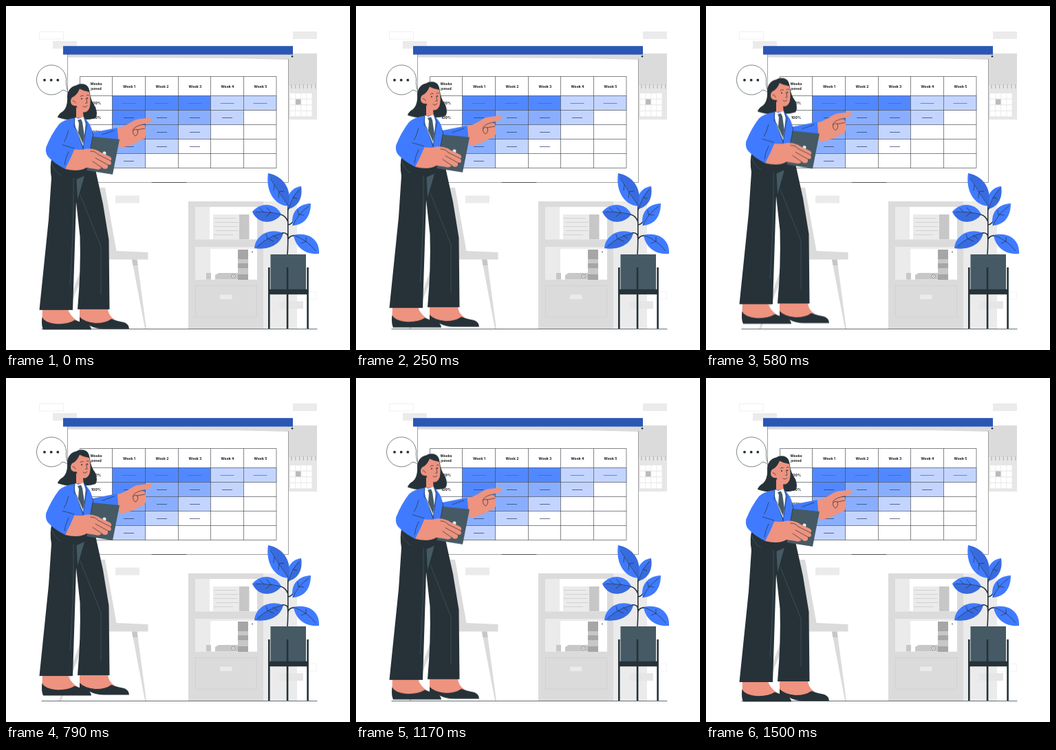
Write an HTML page that moves like this. It is 500 px wide and 500 px high and loops after 1540 ms.

```html
<!DOCTYPE html>
<html lang="en">
<head>
<meta charset="utf-8">
<title>Weekly chart presentation</title>
<style>
html, body { margin: 0; width: 100%; height: 100%; overflow: hidden; background: #fff; }
svg { display: block; width: 100vw; height: 100vh; }
text { font: 700 5.2px Inter, "Open Sans", sans-serif; fill: #1b1b1b; }
.line { fill: none; stroke: #263238; stroke-width: .7; stroke-linecap: round; stroke-linejoin: round; }
.seam { fill: none; stroke: #455a64; stroke-width: .7; }
.dark { fill: #263238; }
.slate { fill: #455a64; }
.blue { fill: #407bff; }
.skin { fill: #ed9380; }
.g1 { fill: #ebebeb; }
.g2 { fill: #dbdbdb; }
.g3 { fill: #c7c7c7; }
.white { fill: #fff; }
#woman { animation: bob 770ms cubic-bezier(.364, 0, .636, 1) -60ms infinite alternate; }
@keyframes bob {
  from { transform: translateY(0); }
  to { transform: translateY(-9.2px); }
}
</style>
</head>
<body>
<svg viewBox="0 0 500 500">
  <g id="wall">
    <rect x="48.5" y="37.5" width="35" height="10.5" fill="none" stroke="#f0f0f0"/>
    <rect class="g1" x="68" y="51" width="35" height="11"/>
    <rect class="g1" x="417" y="37" width="35" height="11"/>
    <rect class="g1" x="159" y="275.5" width="35" height="11"/>
    <rect x="417.5" y="415.5" width="34" height="10.5" fill="none" stroke="#f4f4f4"/>
    <rect class="g2" x="408" y="69" width="44" height="47"/>
    <g id="calendar"><rect x="408" y="115" width="44" height="50" fill="#e6e6e6"/></g>
  </g>

  <g id="chair">
    <path class="g2" d="M118 264H144L160.500 356 206.500 358V368.500H120Z"/>
    <path class="g2" d="M183 368.500H190.500L204 469H202ZM114 368H121L80 469H77Z"/>
    <path class="g3" d="M183 368.500H190.500L191.600 377H184.400Z"/>
  </g>

  <g id="cabinet">
    <rect class="g1" x="374" y="284" width="49" height="185"/>
    <rect x="397" y="429" width="35" height="11" fill="#e6e6e6"/>
    <rect class="g2" x="265" y="284" width="109" height="185"/>
    <rect class="g1" x="275" y="292" width="90" height="47.500"/>
    <rect class="white" x="296" y="292" width="69" height="47"/>
    <rect class="g1" x="301" y="303" width="38" height="36"/>
    <rect class="g3" x="339" y="303" width="14.500" height="36"/>
    <path d="M302 308.500H334M304 314.500H338M302 320.500H336M305 326.500H338M302 332.500H330" stroke="#c7c7c7" stroke-width=".7"/>
    <rect class="g1" x="275" y="350" width="90" height="48"/>
    <rect class="white" x="297" y="353" width="68" height="44.500"/>
    <rect class="g3" x="337" y="354" width="15" height="44"/>
    <path fill="#a6a6a6" d="M337 354H352V368H337ZM337 374H352V381H337ZM337 390H352V398H337Z"/>
    <path class="g3" d="M291 388H298V397.500H291ZM309 388H337V397.500H304V391Z"/>
    <circle cx="330.500" cy="392.800" r="2.600" fill="#fff" stroke="#777" stroke-width=".8"/>
    <circle cx="330.500" cy="392.800" r=".8" fill="#555"/>
    <circle cx="358" cy="357.500" r="1" fill="#777"/>
    <rect x="275.500" y="406.500" width="89" height="45.500" fill="none" stroke="#cfcfcf" stroke-width=".8"/>
    <rect class="g1" x="311" y="419.500" width="17.500" height="6.500"/>
  </g>

  <g id="board">
    <path class="white" d="M89.500 70H410.500V256.500H89.500Z" stroke="#777" stroke-width=".7"/>
    <path class="g2" d="M90 71H414L410 78 330 76 90 74.500Z"/>
    <path class="line" d="M212 256.500H262"/>
    <rect x="83" y="58.200" width="334" height="12.400" fill="#2a56b5"/>
    <circle class="dark" cx="416" cy="73.300" r="1.300"/>
    <g id="table"></g>
  </g>

  <path class="line" d="M52 469.500H452"/>

  <g id="plant">
    <path class="line" style="stroke-width:1.600" d="M409 362C411 335 409 310 410 291M410 314Q407 305 399 303M410 318Q416 317 418 311M409.500 337Q411 330 402 329.500M409.500 340Q412 333 420 334M410 297Q410 290 412 285"/>
    <g class="blue">
      <path d="M381 243C401 247 416 263 411 291C390 290 377 269 381 243Z"/>
      <path d="M429 262C412 264 405 281 411 295C428 290 431 275 429 262Z"/>
      <path d="M443 287C423 288 413 302 417 319C436 318 443 303 443 287Z"/>
      <path d="M358 299C370 284 393 286 400 303C389 318 366 318 358 299Z"/>
      <path d="M361 352C362 335 381 321 403 330C399 348 380 355 361 352Z"/>
      <path d="M455 360C456 340 440 328 418 333C421 352 437 362 455 360Z"/>
    </g>
    <g opacity=".12">
      <path d="M381 243C401 247 416 263 411 291Q397 270 381 243Z"/>
      <path d="M429 262C431 275 428 290 411 295Q415 278 429 262Z"/>
      <path d="M358 299C366 318 389 318 400 303Q380 299 358 299Z"/>
      <path d="M361 352C380 355 399 348 403 330Q382 334 361 352Z"/>
    </g>
    <path class="line" d="M384 250Q397 272 411 291M390 260L389 268M397 270L396 279M397 270L404 269M426 267Q415 278 411 295M417 278L423 280M440 291Q424 302 417 319M425 303L433 304M425 303L424 297M363 299Q383 299 400 303M374 299L369 294M385 300L379 293M385 300L378 306M366 349Q382 334 403 330M380 338L378 332M380 338L389 342M388 333L395 338M450 356Q438 340 418 333M436 342L436 336M436 342L429 345"/>
    <rect class="slate" x="384.500" y="361" width="51.500" height="52"/>
    <path class="dark" d="M381 380H383.600V411.700H407.800V380H410.400V411.700H437.300V380H439.900V469H437.300V419.300H410.400V469H407.800V419.300H383.600V469H381Z"/>
  </g>

  <g id="bubble">
    <path class="white" d="M87.300 111.300A21.600 21.600 0 1 0 82 122Q86 122 90.500 126Q87.500 119 87.300 111.300Z" stroke="#263238" stroke-width=".6"/>
    <circle class="dark" cx="56" cy="107.700" r="1.900"/>
    <circle class="dark" cx="65.700" cy="107.700" r="1.900"/>
    <circle class="dark" cx="75.300" cy="107.700" r="1.900"/>
  </g>

  <g id="woman">
    <path class="skin" d="M107 438H148Q148 450 158 456L150 464 120 463 107 456Z"/>
    <path class="dark" d="M107 452Q113 459 130 461Q145 461 153 455Q163 458.500 172 460Q179 463 179 469.500H142Q131 469.500 121 464.500L107 460Z"/>
    <path class="skin" d="M53 438H89Q92 450 104 458L95 465H60L52.500 456Z"/>
    <path class="dark" d="M52.500 452.500Q56 460 72 462Q90 463 100 456.500Q108 460 117 461.500Q123 464 124 470.500H54Q51 464 52.500 452.500Z"/>

    <path class="dark" d="M67 219Q63 234 66 250L62 310 48.500 442H97L102 285 107.500 335Q109 385 104 441H150.500L149.500 340 141 288 130 238 127 216Z"/>
    <path class="slate" d="M102.500 252L114 247 104 282Z"/>
    <path class="seam" d="M98 250Q99 320 93 405M108 275L138 350V420"/>
    <path class="seam" d="M66 229Q73 244 80 246"/>

    <path class="dark" d="M89 132Q90 118 102 115.500Q106 112.500 113 113.500Q120 115 121.500 124Q123 138 130 147Q134 158 130 163Q117 167 108 164Q92 168 75 162Q76 157 83 153Q90 146 89 132Z"/>
    <path class="skin" d="M102 147L112 154 113 165Q107 169 102 163Z"/>
    <path class="skin" d="M97 132.500Q103 130 107 120.500Q113 124 121 125Q124 139 121.500 148Q118 156.500 110 154Q104 151 102.500 145Q94.500 146 94 139Q94 134 97 132.500Z"/>
    <path class="line" d="M97 138Q100 137 101 141M108 131.500Q110 129.500 112.500 130.500M117 130Q119 128.500 120.500 130M116.500 134L118 141 115.500 141.500M112 146Q115 148.500 118 145"/>
    <circle class="dark" cx="110" cy="135" r="1"/>
    <circle class="dark" cx="118.300" cy="134.300" r="1"/>

    <path class="blue" d="M99 163L113 162Q123 170 126 184L161.500 177 165 195 130 205 127 219 113 222 67 219Q59 213 58 206Q66 186 77 172Q84 165 99 163Z"/>
    <path class="white" d="M100 162L105 164 113 161 115.500 171 112.500 204Q104 189 100 171Z"/>
    <path class="slate" d="M104 166L109 164.500 111 169 114 189 112 201 105 184 106 170Z"/>
    <path class="line" d="M100 163L99 176 103 180 112 207M113 162L118 172 116 180 112 207L113 217M91 181Q88 193 82 202M126 184L128 199M140 187L157 181"/>
    <circle class="dark" cx="110" cy="209" r=".8"/>

    <path class="skin" d="M162 178Q173 175 180 170Q188 164 197 164L209 162.500Q213 163 211.500 167Q207 171 197 172.500Q203 174 203.500 179L203 189Q202 194 196 195Q183 203 168 206L164 205Z"/>
    <path class="line" d="M202 172Q190 173 185 179Q183 186 188 189Q193 187 191 180Q188 178 185 181M191 180L202 178"/>

    <path class="slate" d="M126 190L165 194 155 245 117 239Z"/>
    <path class="line" d="M126 190L117 239"/>
    <circle class="g1" cx="143" cy="214" r="2.500"/>
    <path class="skin" d="M96 208Q109 210 118 207.500Q130 207 138 213L151 219Q155 222 152 225L153 229Q152 232 148 230.500L148 235Q145 239 139 235Q136 239 130 237L117 235Q106 242 86 237Z"/>
    <path class="line" d="M134 216L152 225M130 221L148 231M126 226L140 235.500M123 211Q130 211 134 216"/>
    <path class="blue" d="M67 192L87 199 100 207Q94 222 86 237Q70 229 61 219Q56 212 59 205Z"/>
    <path class="line" d="M82 202L99 207M91 212Q86 222 85 231"/>
  </g>
</svg>
<script>
const NS = "http://www.w3.org/2000/svg";
const add = (parent, tag, attrs, label) => {
  const el = document.createElementNS(NS, tag);
  for (const k in attrs) el.setAttribute(k, attrs[k]);
  if (label) el.textContent = label;
  parent.append(el);
};

const table = document.getElementById("table");
const colX = i => Math.floor(107 + 47.67 * i) + .5;
const rowY = i => 130.5 + 21 * i;
const label = (x, y, s) => add(table, "text", { x, y, "text-anchor": "middle" }, s);
const shades = { a: "#5288ff", b: "#8aaeff", c: "#c3d5ff", w: "#fff" };
const cells = ["aaacc", "abbc", "bbc", "bcw", "c"];

cells.forEach((row, r) => [...row].forEach((shade, c) => {
  const x = colX(c + 1), y = rowY(r);
  add(table, "rect", { x, y, width: colX(c + 2) - x, height: 21, fill: shades[shade] });
  const half = r ? 7.5 : 10;
  add(table, "path", {
    d: `M${x + 24 - half} ${y + 11}h${2 * half}`,
    stroke: r ? "#26365c" : "#3868c8", "stroke-width": .7
  });
}));

let grid = "M107.500 102.500H393V235.500H107.500Z";
for (let i = 1; i < 6; i++) grid += `M${colX(i)} 102.500V235.500`;
for (let i = 0; i < 5; i++) grid += `M107.500 ${rowY(i)}H393`;
add(table, "path", { d: grid, fill: "none", stroke: "#30343b", "stroke-width": .6 });

label(131, 115.300, "Weeks");
label(131, 121.500, "joined");
for (let i = 0; i < 5; i++) {
  label(colX(i + 1) + 24.500, 118.800, "Week " + (i + 1));
  label(131, rowY(i) + 12.500, "100%");
}

const calendar = document.getElementById("calendar");
for (let i = 0; i < 7; i++)
  add(calendar, "path", { d: `M${415 + i * 5.8} 114v6`, stroke: "#b8b8b8", "stroke-width": 1.3 });
for (let i = 0; i < 16; i++) {
  const c = i % 4, r = i >> 2;
  add(calendar, "rect", {
    x: 413 + c * 8.1, y: 127 + r * 8.6, width: 7.3, height: 7.6,
    fill: c === 1 && r === 1 ? "#bababa" : "#fff"
  });
}
</script>
</body>
</html>
```
